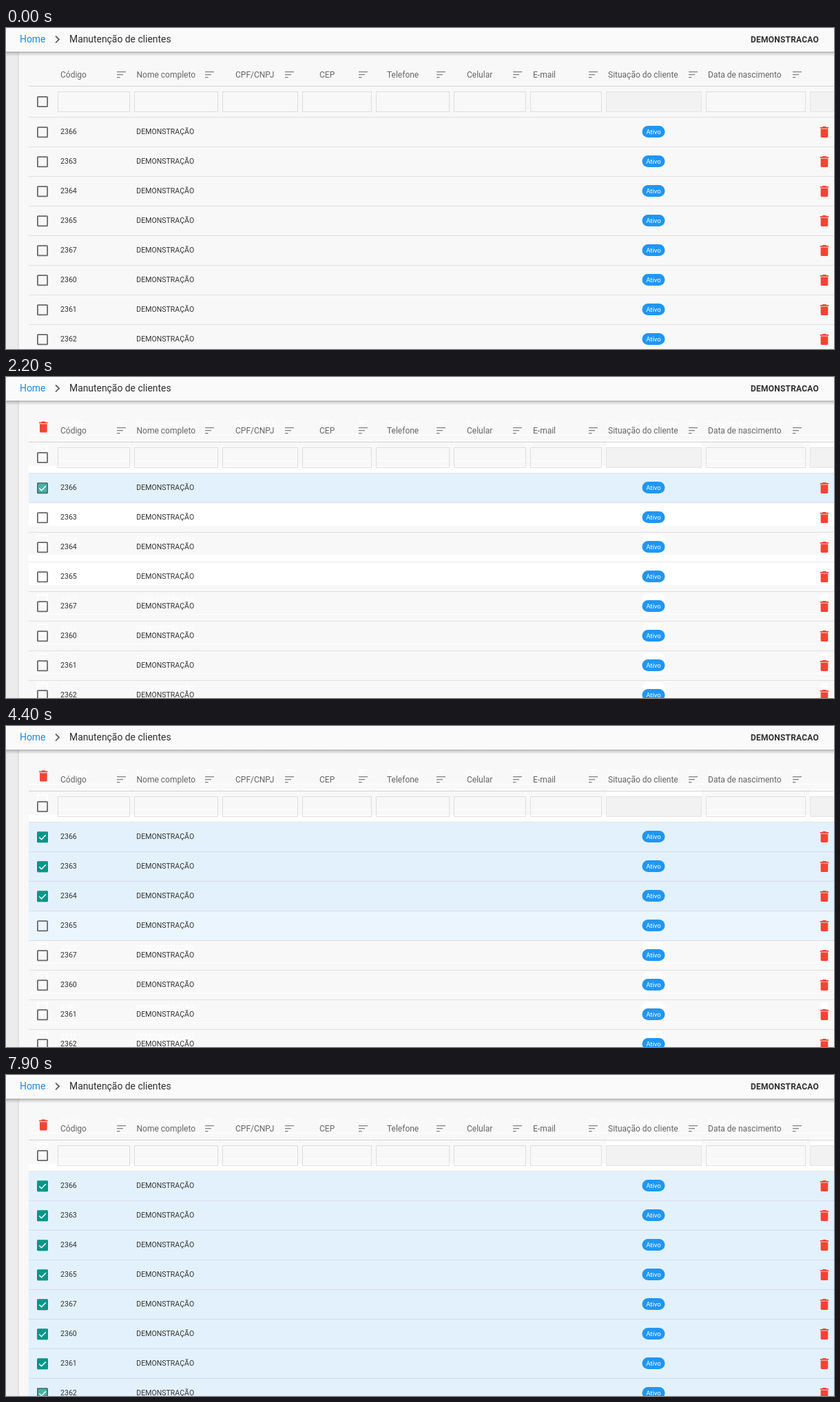
These frames come from a looping animation (1202x466 px, 8000 ms). An HTML page:

```html
<!DOCTYPE html>
<html lang="pt">
<head>
<meta charset="utf-8">
<title>Manutenção de clientes</title>
<style>
  html, body { margin: 0; width: 100%; height: 100%; overflow: hidden; background: #f8f8f8; }
  svg { display: block; width: 1202px; height: 466px; font-family: Roboto, sans-serif; }
</style>
</head>
<body>
<svg id="stage" viewBox="0 0 1202 466" xmlns="http://www.w3.org/2000/svg">
  <defs>
    <linearGradient id="shade" x2="0" y2="1">
      <stop offset="0" stop-color="#000" stop-opacity=".4"/>
      <stop offset=".35" stop-color="#000" stop-opacity=".15"/>
      <stop offset="1" stop-color="#000" stop-opacity="0"/>
    </linearGradient>
    <linearGradient id="edge">
      <stop offset="0" stop-color="#ececec"/>
      <stop offset="1" stop-color="#dcdcdc"/>
    </linearGradient>
  </defs>
</svg>
<script>
const LOOP = 8000, SHIFT_AT = 2200, SHIFT = 10, ROW = 43, LEFT = 33, WIDTH = 1169;
const RED = '#f44336', TEAL = '#009688';
const BIN = 'M6 19c0 1.1.9 2 2 2h8c1.1 0 2-.9 2-2V7H6v12zM19 4h-3.5l-1-1h-5l-1 1H5v2h14V4z';
const BOX = 'M19 5v14H5V5h14m0-2H5c-1.1 0-2 .9-2 2v14c0 1.1.9 2 2 2h14c1.1 0 2-.9 2-2V5c0-1.1-.9-2-2-2z';

// label, text x, sort icon x
const columns = [
  ['Código', 79, 161], ['Nome completo', 189.5, 289], ['CPF/CNPJ', 333, 405],
  ['CEP', 455, 512], ['Telefone', 553, 625], ['Celular', 669, 736],
  ['E-mail', 765, 846], ['Situação do cliente', 874, 991], ['Data de nascimento', 1019, 1142]
];
// left, right, disabled
const filters = [
  [75, 179], [186, 307], [314, 423], [430, 530], [537, 643], [650, 754],
  [761, 864], [871, 1009, true], [1016, 1160], [1167, 1210, true]
];
// code, hover time, check time, time of the full tick
const rows = [
  [2366, 1900, 2200, 2300], [2363, 2800, 3100, 3200], [2364, 3600, 4000, 4100],
  [2365, 4400, 4900, 5000], [2367, 5300, 5600, 5700], [2360, 6000, 6400, 6500],
  [2361, 6900, 7200, 7400], [2362, 7700, 7900, 8000]
];

const stage = document.getElementById('stage');

function add(parent, tag, attrs, text) {
  const el = document.createElementNS('http://www.w3.org/2000/svg', tag);
  for (const key in attrs) el.setAttribute(key, attrs[key]);
  if (text !== undefined) el.textContent = text;
  parent.appendChild(el);
  return el;
}
const group = parent => add(parent, 'g', {});
const rect = (parent, x, y, width, height, fill, more) =>
  add(parent, 'rect', { x, y, width, height, fill, ...more });
const label = (parent, x, y, size, fill, text, more) =>
  add(parent, 'text', { x, y, 'font-size': size, fill, ...more }, text);
const icon = (parent, d, cx, cy, fill) =>
  add(parent, 'path', { d, fill, transform: `translate(${cx} ${cy}) scale(.89) translate(-12 -12)` });
const show = (el, on) => el.setAttribute('visibility', on ? 'visible' : 'hidden');

rect(stage, 0, 0, 1202, 466, '#f8f8f8');
rect(stage, 0, 0, 17, 466, '#ececec');
rect(stage, 16, 0, 3, 466, 'url(#edge)');

// White rows left behind by the pointer: row index, start time
const whites = [[3, 500], [1, 700], [0, 900]].map(([i, start]) => ({
  el: rect(stage, LEFT, 130 + i * ROW, WIDTH, ROW, '#fff'), start
}));
const ghostLayer = group(stage);
const bandLayer = group(stage);
const grid = group(stage);

for (const [name, x, iconX] of columns) {
  label(grid, x, 72, 12, '#666', name);
  [13, 9, 4.5].forEach((w, k) => rect(grid, iconX, 63 + k * 4, w, 1.3, '#858585'));
}
rect(grid, LEFT, 84, WIDTH, 1, '#d2d2d2');
icon(grid, BOX, 53, 107, '#686868');
for (const [l, r, off] of filters)
  rect(grid, l + .5, 92.5, r - l, 29, off ? '#f2f2f2' : 'none', { stroke: off ? '#e5e5e5' : '#dedede' });
rect(grid, LEFT, 129, WIDTH, 1, '#000', { 'fill-opacity': .1 });

rows.forEach(([code], i) => {
  const y = 130 + i * ROW;
  icon(grid, BOX, 53, y + 21.2, '#686868');
  label(grid, 79, y + 23.6, 10.6, '#333', code);
  label(grid, 189.3, y + 23.6, 10.57, '#333', 'DEMONSTRAÇÃO');
  rect(grid, 923.5, y + 12, 33, 17, '#2196f3', { rx: 8.5 });
  label(grid, 940, y + 24, 9.6, '#fff', 'Ativo', { 'text-anchor': 'middle' });
  icon(grid, BIN, 1188, y + 21, RED);
  rect(grid, LEFT, y + 42, WIDTH, 1, '#000', { 'fill-opacity': .1 });
});

// Faint white trace of the table at its first position
const ghost = ghostLayer.appendChild(grid.cloneNode(true));
for (const el of ghost.children) {
  if (el.getAttribute('fill') !== 'none') el.setAttribute('fill', '#fff');
  if (el.hasAttribute('stroke')) el.setAttribute('stroke', '#fff');
  el.removeAttribute('fill-opacity');
}

const marks = rows.map(([, hover, check, full], i) => {
  const y = 130 + i * ROW, cy = y + 21.2;
  const band = rect(bandLayer, LEFT, y, WIDTH, 42.5, '#e3f1fd');
  const tick = group(grid);
  rect(tick, 45, cy - 8, 16, 16, '#fff', { rx: 1.5 });
  const edge = rect(tick, 45, cy - 8, 16, 16, '#3f6e69', { rx: 1.5 });
  const fill = rect(tick, 45, cy - 8, 16, 16, TEAL, { rx: 1.5 });
  add(tick, 'path', {
    d: `M48.3 ${cy + .3}l3.2 3.2 6.3-6.5`, fill: 'none', stroke: '#fff', 'stroke-width': 1.5
  });
  return { hover, check, full, band, tick, edge, fill, cy };
});

const topBin = icon(stage, BIN, 54.3, 72.6, RED);

rect(stage, 0, 34, 1202, 7, 'url(#shade)');
rect(stage, 0, 0, 1202, 34.5, '#fafafa');
label(stage, 20, 21, 13.9, '#1e88e5', 'Home');
add(stage, 'path', { d: 'M72 11.7l5 4.9-5 4.9', fill: 'none', stroke: '#555', 'stroke-width': 1.7 });
label(stage, 92, 21, 13.9, '#303030', 'Manutenção de clientes');
label(stage, 1081, 21, 12, '#303030', 'DEMONSTRACAO', { 'font-weight': 700, 'letter-spacing': .22 });

function drawMark(m, t) {
  const checked = t >= m.check, whole = t >= m.full;
  show(m.band, t >= m.hover);
  m.band.setAttribute('fill', checked ? '#e3f1fd' : t < SHIFT_AT ? '#e6f3fd' : '#ebf5fe');
  show(m.tick, checked);
  // While fading in, the fill sits inside a dark outline
  const inset = whole ? 0 : 1.5, size = 16 - 2 * inset;
  show(m.edge, checked && !whole);
  m.fill.setAttribute('x', 45 + inset);
  m.fill.setAttribute('y', m.cy - 8 + inset);
  m.fill.setAttribute('width', size);
  m.fill.setAttribute('height', size);
  m.fill.setAttribute('fill', whole ? TEAL : t - m.check < 100 ? '#46b2a6' : '#1fa093');
}

function draw(t) {
  const shifted = t >= SHIFT_AT;
  const move = `translate(0 ${shifted ? SHIFT : 0})`;
  grid.setAttribute('transform', move);
  bandLayer.setAttribute('transform', move);
  show(ghostLayer, shifted);
  show(topBin, shifted);
  for (const w of whites) show(w.el, t >= w.start);
  for (const m of marks) drawMark(m, t);
}

const start = performance.now();
function frame() {
  draw((performance.now() - start) % LOOP);
  requestAnimationFrame(frame);
}
frame();
</script>
</body>
</html>
```
